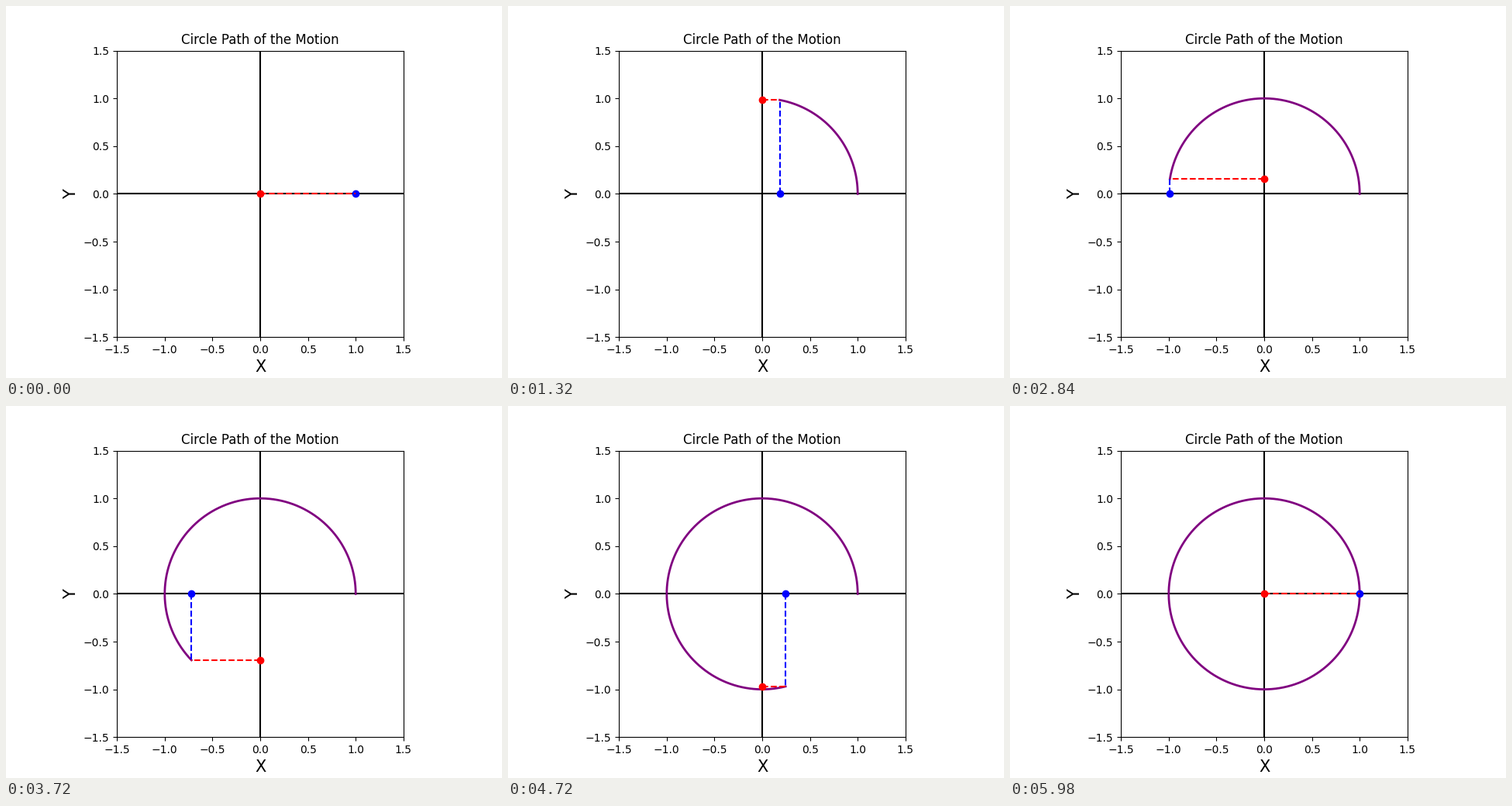
Write a matplotlib script that moves like this. It is 640 by 480 pixels and loops after 6000 ms.

```python
import numpy as np
import matplotlib.pyplot as plt
from matplotlib.animation import FuncAnimation

FRAMES = 300
theta = np.linspace(0, 2 * np.pi, FRAMES)
xs, ys = np.cos(theta), np.sin(theta)

fig, ax = plt.subplots(figsize=(6.4, 4.8), dpi=100)
ax.set(xlim=(-1.5, 1.5), ylim=(-1.5, 1.5), aspect="equal")
ax.set_title("Circle Path of the Motion")
ax.set_xlabel("X", fontsize=15)
ax.set_ylabel("Y", fontsize=15)
ax.axhline(0, color="black")
ax.axvline(0, color="black")

trail, = ax.plot([], [], color="purple", lw=2)
x_dot, = ax.plot([], [], "o", color="blue")
y_dot, = ax.plot([], [], "o", color="red")
x_drop, = ax.plot([], [], "--", color="blue")
y_drop, = ax.plot([], [], "--", color="red")


def update(i):
    x, y = xs[i], ys[i]
    trail.set_data(xs[:i + 1], ys[:i + 1])
    x_dot.set_data([x], [0])
    y_dot.set_data([0], [y])
    x_drop.set_data([x, x], [0, y])
    y_drop.set_data([0, x], [y, y])
    return trail, x_dot, y_dot, x_drop, y_drop


anim = FuncAnimation(fig, update, frames=FRAMES, interval=20, repeat=True,
                     repeat_delay=0)
plt.show()
```
